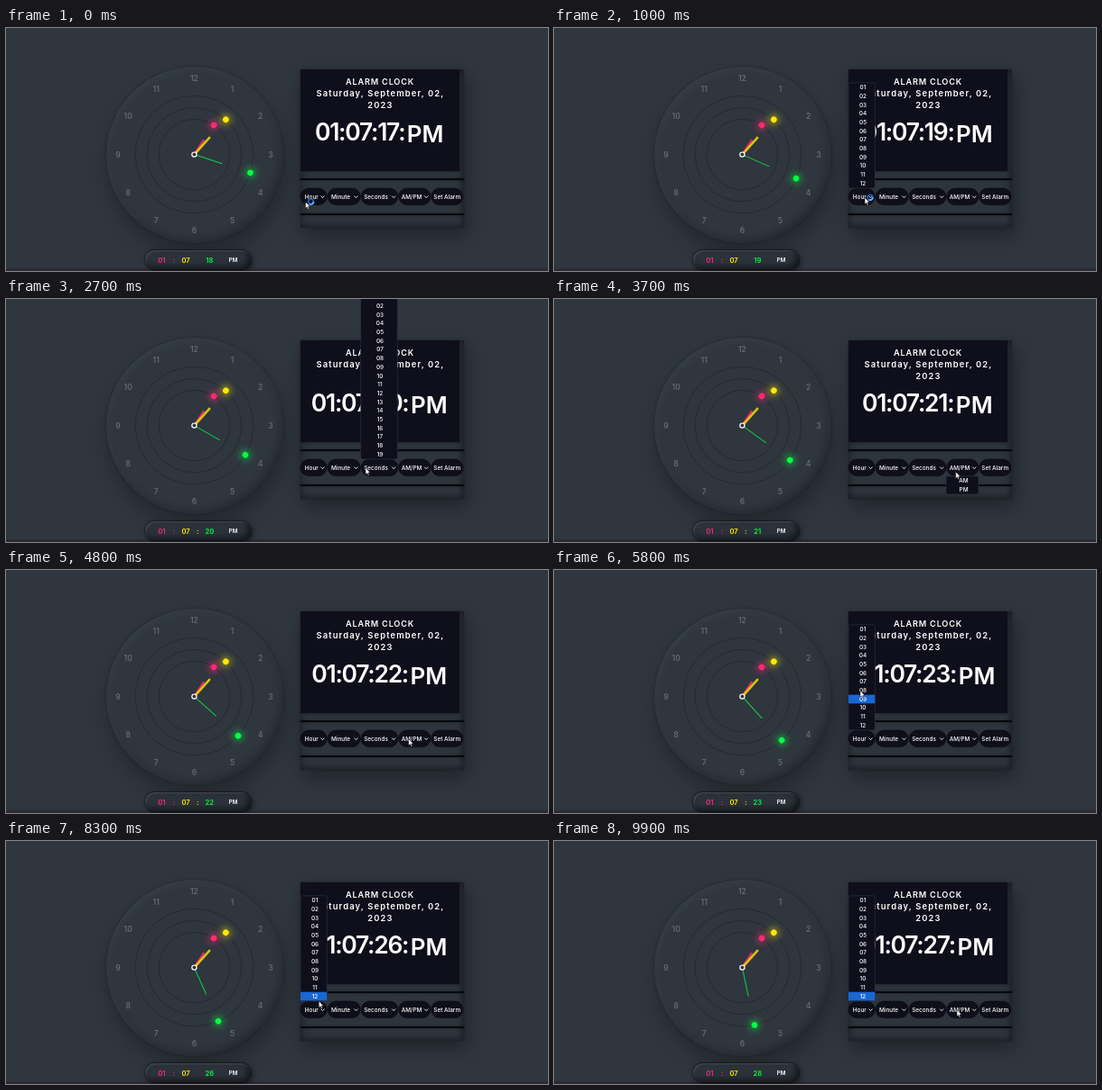
Animation, 600 px wide and 270 px high, one loop 10 s. Source, as an HTML page:

```html
<!DOCTYPE html>
<html lang="en">
<head>
<meta charset="utf-8">
<title>Alarm clock</title>
<style>
  html, body { margin: 0; width: 100%; height: 100%; overflow: hidden; background: #2f363e; }
  div, svg { position: absolute; box-sizing: border-box; }
  svg { left: 0; top: 0; }
  text { font-family: Inter, "Open Sans", sans-serif; font-weight: 500; fill: #fff; text-anchor: middle; }
  #floor { left: 0; top: 266px; width: 600px; height: 4px; background: linear-gradient(#2f363e, #2b2932 60%); }
  #dial {
    left: 110.5px; top: 42.5px; width: 196px; height: 196px; border-radius: 50%; background: #2f363e;
    box-shadow: 3px 13px 22px rgba(0,0,0,.25), 0 0 3px rgba(0,0,0,.25),
      inset 2px 3px 8px rgba(255,255,255,.05), inset -3px -4px 9px rgba(0,0,0,.22);
  }
  #pill {
    left: 154px; top: 247px; width: 116.5px; height: 21px; border-radius: 11px; background: #2c323a;
    box-shadow: 2px 2px 6px rgba(0,0,0,.55), 0 0 1px 1px rgba(0,0,0,.35),
      inset 1px 1px 2px rgba(255,255,255,.14), inset -3px -3px 6px rgba(0,0,0,.5);
  }
  #panel {
    left: 326px; top: 46px; width: 180.5px; height: 176px; background: #2e343c; border-radius: 1px;
    box-shadow: 3px 8px 20px rgba(0,0,0,.35), 0 0 2px rgba(0,0,0,.3),
      inset 3px 3px 6px rgba(0,0,0,.22), inset -3px -3px 6px rgba(0,0,0,.32);
  }
  #screen {
    left: 326px; top: 46px; width: 176px; height: 112.8px; background: #0f0e1b;
    box-shadow: 1px 1px 3px rgba(0,0,0,.35);
  }
  .rule { left: 326px; width: 180.5px; height: 2px; background: #07080c; box-shadow: 0 0 3px rgba(0,0,0,.35); }
  .ring { fill: none; stroke: #22272d; stroke-width: .8; }
  .numeral { font-size: 8.5px; font-weight: 600; fill-opacity: .26; }
  .small { font-size: 6.4px; }
  .pill { font-size: 7.6px; font-weight: 600; }
  .box { fill: #0f0e1b; }
  .button { stroke: #090910; stroke-width: .6; }
  .popup { stroke: #343743; stroke-width: .6; }
  .chevron { fill: none; stroke: #fff; stroke-width: .9; }
</style>
</head>
<body>
<div id="floor"></div>
<div id="dial"></div>
<div id="pill"></div>
<div id="panel"></div>
<div id="screen"></div>
<div class="rule" style="top:167.2px"></div>
<div class="rule" style="top:205.8px"></div>
<svg id="stage" width="600" height="270" viewBox="0 0 600 270">
  <defs>
    <filter id="glow" x="-300%" y="-300%" width="700%" height="700%"><feGaussianBlur stdDeviation="4.2"/></filter>
  </defs>
  <g id="face"></g>
  <g id="hands"></g>
  <circle cx="208.4" cy="140.6" r="2.6" fill="#2f363e" stroke="#fff" stroke-width="1.2"/>
  <g id="digital">
    <text class="pill" x="172.3" y="260.7" style="fill:#ff2972">01</text>
    <text class="pill" x="186" y="260.5" style="fill:#ff2972">:</text>
    <text class="pill" x="199" y="260.7" style="fill:#fee800">07</text>
    <text class="pill" x="212.3" y="260.5" style="fill:#fee800" id="colon">:</text>
    <text class="pill" x="225.3" y="260.7" style="fill:#04fc43" id="pillSeconds"></text>
    <text class="pill" x="251.5" y="260.2" style="font-size:6.1px">PM</text>
  </g>
  <g style="font-weight:600">
    <text x="414" y="62.8" style="font-size:9.2px;font-weight:inherit;letter-spacing:.8px">ALARM CLOCK</text>
    <g style="font-size:9.4px;letter-spacing:1.13px">
      <text x="414.5" y="76" style="font-weight:inherit">Saturday, September, 02,</text>
      <text x="414.5" y="89.3" style="font-weight:inherit">2023</text>
    </g>
    <text x="413.3" y="124.7" style="font-size:26px;font-weight:inherit"><tspan id="time" style="font-size:26.5px;letter-spacing:-1.3px"></tspan><tspan dx="2.5" dy="2">PM</tspan></text>
  </g>
  <g id="controls"></g>
  <g id="popups"></g>
  <g id="cursor">
    <g id="busy" fill="none" stroke-width="1.8">
      <circle cx="6" cy="0" r="2.9" stroke="#1c5fb4"/>
      <circle id="arc" cx="6" cy="0" r="2.9" stroke="#5fb4ff" stroke-dasharray="6 13"/>
    </g>
    <path d="M0 0V7.4L1.7 5.9L2.9 8.6L4.1 8.1L2.9 5.4H5.3Z" fill="#fff" stroke="#000" stroke-width=".5"/>
  </g>
</svg>
<script>
const $ = id => document.getElementById(id);
const LOOP = 10000, CX = 208.4, CY = 140.6, ROW = 9.7, LAST_ROW = 172.5;

function add(parent, tag, attrs, text = '') {
  const el = document.createElementNS('http://www.w3.org/2000/svg', tag);
  for (const key in attrs) el.setAttribute(key, attrs[key]);
  el.textContent = text;
  return parent.appendChild(el);
}

// Dial
for (let h = 1; h <= 12; h++) {
  const a = h * Math.PI / 6;
  add($('face'), 'text', {
    class: 'numeral', x: CX + 84.5 * Math.sin(a), y: CY + 3.1 - 84.5 * Math.cos(a)
  }, h);
}

function makeHand(radius, color, width, angle) {
  add($('face'), 'circle', { class: 'ring', cx: CX, cy: CY, r: radius });
  const g = add($('hands'), 'g', { transform: `rotate(${angle} ${CX} ${CY})` });
  add(g, 'path', { d: `M${CX} ${CY}v${-radius / 2}`, stroke: color, 'stroke-width': width, opacity: .8 });
  const dot = { cx: CX, cy: CY - radius, fill: color };
  add(g, 'circle', { ...dot, r: 4, filter: 'url(#glow)' });
  add(g, 'circle', { ...dot, r: 3.3 });
  return g;
}
const secondHand = makeHand(65.3, '#04fc43', 1, 0);
makeHand(39.2, '#ff2972', 2.6, 33.5);
makeHand(52.2, '#fee800', 2.6, 42);

// Buttons: label, left, right, label centre
[['Hour', 326, 355.3, 338.3], ['Minute', 356, 392.3, 370.5], ['Seconds', 393, 434, 409.5],
 ['AM/PM', 434.7, 470, 449], ['Set Alarm', 470.7, 506, 488.2]].forEach(([label, left, right, mid], i) => {
  const g = $('controls');
  add(g, 'rect', { class: 'box button', x: left, y: 178, width: right - left, height: 18.6, rx: 9.3 });
  add(g, 'text', { class: 'small', x: mid, y: 189.7 }, label);
  if (i < 4) add(g, 'path', { class: 'chevron', d: `M${right - 6.8} 186.6l2 2l2 -2` });
});

// Popup lists, each with the times it is open
const numbers = (from, n) => Array.from({ length: n }, (_, i) => String(from + i).padStart(2, '0'));

function makePopup(items, left, width, mid, lastRow, spans) {
  const g = add($('popups'), 'g', {});
  const first = lastRow - (items.length - 1) * ROW;
  add(g, 'rect', {
    class: 'box popup', x: left, y: first - 5, width, height: items.length * ROW + .8, rx: 2
  });
  const bar = add(g, 'rect', { x: left, width, height: ROW, fill: '#1967d2', visibility: 'hidden' });
  items.forEach((item, i) => add(g, 'text', { class: 'small', x: mid, y: first + i * ROW + 2.3 }, item));
  return { g, bar, first, spans };
}
const hours = makePopup(numbers(1, 12), 326, 29.3, 342, LAST_ROW, [[500, 1300], [5300, LOOP]]);
const popups = [
  hours,
  makePopup(numbers(0, 20), 356, 36.3, 374.5, LAST_ROW, [[1600, 2200]]),
  makePopup(numbers(0, 20), 392.7, 40.6, 414, LAST_ROW, [[2500, 3200]]),
  makePopup(['AM', 'PM'], 434, 36, 453.5, 211.5, [[3500, 3900]])
];

// Pointer path: time, x, y
const path = [
  [0, 331.5, 193], [500, 344, 188.3], [1100, 344, 188.3], [1500, 370, 188], [2100, 373, 188],
  [2500, 398, 187.5], [3100, 398, 187.5], [3500, 443, 190], [3700, 444.7, 192], [3800, 444.7, 192],
  [4400, 497, 188], [4600, 497, 188], [5200, 343, 187], [5500, 342, 160], [5800, 339, 134],
  [6100, 340, 118], [6900, 348, 171.5], [7900, 343, 173], [9000, 352, 186], [9100, 352, 186],
  [9900, 446, 187.5], [LOOP, 446, 187.5]
];
function pointer(t) {
  const i = path.findIndex(p => p[0] > t), [t0, x0, y0] = path[i - 1], [t1, x1, y1] = path[i];
  const k = (t - t0) / (t1 - t0);
  return [x0 + (x1 - x0) * k, y0 + (y1 - y0) * k];
}

const show = (el, on) => el.setAttribute('visibility', on ? 'visible' : 'hidden');

function render(time) {
  const t = Math.floor(time % LOOP / 100) * 100;
  const seconds = 18 + Math.floor((t + 100) / 1000);
  secondHand.setAttribute('transform', `rotate(${seconds * 6} ${CX} ${CY})`);
  $('pillSeconds').textContent = seconds;
  $('time').textContent = `01:07:${t < 100 ? 17 : 18 + Math.floor(t / 1000)}:`;
  show($('colon'), t % 1000 >= 400 && t % 1000 < 900);

  for (const p of popups) p.g.style.display = p.spans.some(([a, b]) => t >= a && t < b) ? '' : 'none';
  // The highlight trails the pointer by one step
  const hovered = Math.floor((pointer(Math.max(0, t - 100))[1] - hours.first + 5) / ROW);
  hours.bar.setAttribute('y', hours.first - 4.8 + Math.min(11, hovered) * ROW);
  show(hours.bar, t >= 5400);

  const [x, y] = pointer(t);
  $('cursor').setAttribute('transform', `translate(${x} ${y})`);
  show($('busy'), t < 1300);
  $('arc').setAttribute('transform', `rotate(${t * .36} 6 0)`);
}

const start = performance.now();
function loop() {
  render(performance.now() - start);
  requestAnimationFrame(loop);
}
loop();
</script>
</body>
</html>
```
